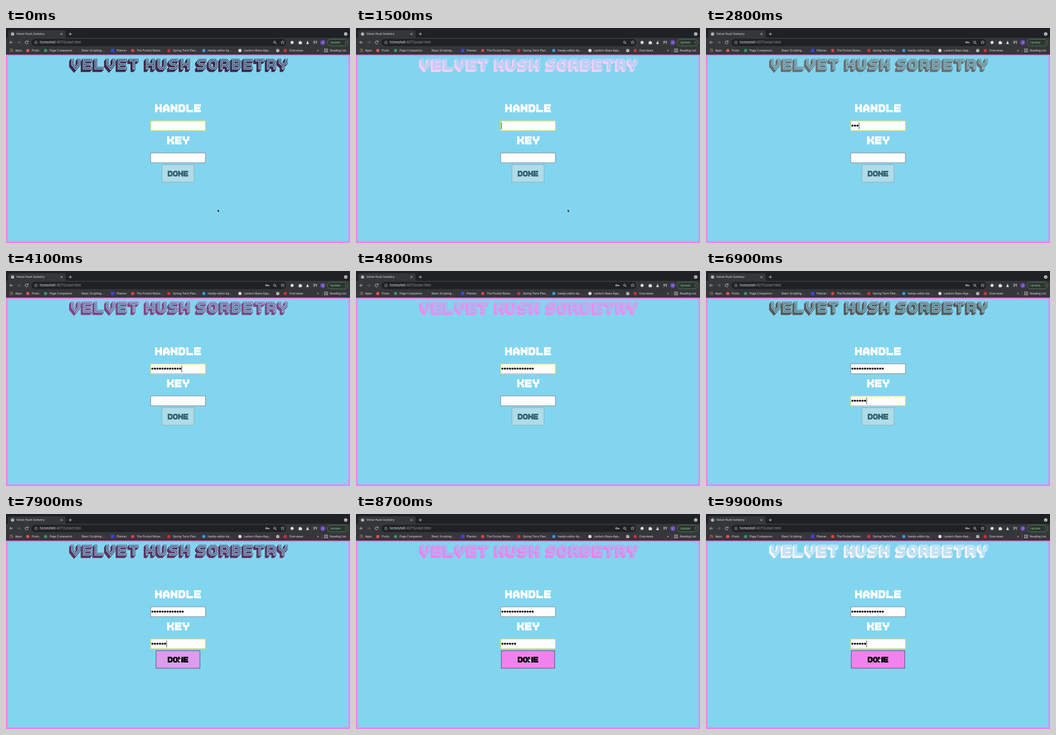
Animation, 600 px wide and 375 px high, one loop 10000 ms. Source, as an HTML page:

```html
<!DOCTYPE html>
<html lang="en">
<head>
<meta charset="utf-8">
<title>Velvet Hush Sorbetry</title>
<style>
  html, body { margin: 0; width: 100%; height: 100%; overflow: hidden; background: #82d5ef; }
  svg { display: block; width: 100vw; height: 100vh; }
  text { font-family: Inter, Roboto, sans-serif; }
</style>
</head>
<body>
<svg id="stage" viewBox="0 0 600 375" preserveAspectRatio="none"></svg>
<script>
const LOOP = 10000, SKY = '#82d5ef', VIOLET = '#f07ff0';
const stage = document.getElementById('stage');

function add(tag, attrs, parent = stage) {
  const el = document.createElementNS('http://www.w3.org/2000/svg', tag);
  set(el, attrs);
  parent.appendChild(el);
  return el;
}
function set(el, attrs) {
  for (const k in attrs) el.setAttribute(k, attrs[k]);
}
const rect = (x, y, width, height, fill, more) => add('rect', { x, y, width, height, fill, ...more });
const circle = (cx, cy, r, fill, more) => add('circle', { cx, cy, r, fill, ...more });
const line = (d, stroke = '#d5d7da', w = 0.8, parent) =>
  add('path', { d, stroke, 'stroke-width': w, fill: 'none' }, parent);
function label(str, x, y, size = 5, fill = '#e3e5e8') {
  const el = add('text', { x, y, 'font-size': size, fill });
  el.textContent = str;
  return el;
}
function globe(x, y) {
  circle(x, y, 2.8, '#d8dadd');
  line(`M${x - 2} ${y - 1}l1.6 .8l-.4 1.4M${x + 0.4} ${y - 2}l.4 1.3l1.4 .2M${x + 0.6} ${y + 1.8}l1-1`, '#44464a', 0.8);
}

// Block lettering: centre lines in a 12 x 14 box
const GLYPHS = {
  A: 'M2 12V6L5 2H7L10 6V12M2 9H10',
  B: 'M2 2H8L10 4V5L9 7L10 9V10L8 12H2ZM2 7H9',
  D: 'M2 2H8L10 4V10L8 12H2Z',
  E: 'M10 2H2V12H10M2 7H9',
  H: 'M2 2V12M10 2V12M2 7H10',
  K: 'M2 2V12M10 2V4L7 7L10 10V12M2 7H7',
  L: 'M2 2V12H10',
  N: 'M2 12V2M2 3.5L10 10.5M10 12V2',
  O: 'M4 2H8L10 4V10L8 12H4L2 10V4Z',
  R: 'M2 12V2H8L10 4V6L8 8H2M8 8L10 10V12',
  S: 'M10 2H4L2 4V5L4 7H8L10 9V10L8 12H2',
  T: 'M2 2H10M6 2V12',
  U: 'M2 2V10L4 12H8L10 10V2',
  V: 'M2 2V7L6 12L10 7V2',
  Y: 'M2 2V5L6 8L10 5V2M6 8V12'
};
function lettering(str, x, y, scale, step, stroke, weight, parent) {
  const g = add('g', {
    fill: 'none', stroke, 'stroke-width': weight, 'stroke-linecap': 'square', 'aria-label': str
  }, parent);
  for (const ch of str) {
    if (ch === ' ') { x += 8.3; continue; }
    add('path', { d: GLYPHS[ch], transform: `translate(${x} ${y}) scale(${scale})` }, g);
    x += step;
  }
  return g;
}

function drawBrowser() {
  rect(0, 0, 600, 46.5, '#35363a');
  rect(0, 0, 600, 17, '#202124');
  add('path', { d: 'M2 17Q4 17 4 14V7Q4 4 7 4H101Q104 4 104 7V14Q104 17 106 17Z', fill: '#35363a' });
  globe(11.5, 10.5);
  label('Velvet Hush Sorbetry', 18, 12.2, 4.9);
  line('M95 8.8l3.4 3.4m0-3.4l-3.4 3.4M109.5 10.5h5.4M112.2 7.8v5.4');
  circle(592.5, 10.5, 3, '#c4c7ca');
  line('M591 10l1.5 1.5l1.5-1.5', '#202124');

  line('M12 25H6.5M9 22.5L6.5 25L9 27.5');
  line('M19.5 25H25M22.5 22.5L25 25L22.5 27.5', '#77797d');
  line('M38.4 24A2.6 2.6 0 1 0 38.4 26.2M38.6 22.2V24.2H36.6');
  rect(44.5, 19, 444, 12.5, '#202124', { rx: 6.2 });
  circle(52.3, 25.2, 2.3, 'none', { stroke: '#c4c7ca', 'stroke-width': 0.6 });
  line('M52.3 24.8v1.7M52.3 23.6v.6', '#c4c7ca', 0.6);
  const url = label('', 59, 27.2, 5.6);
  add('tspan', {}, url).textContent = 'homeshell';
  add('tspan', { fill: '#989ba0' }, url).textContent = ':40713/start.html';

  circle(468.5, 24.7, 1.8, 'none', { stroke: '#d5d7da', 'stroke-width': 0.8 });
  line('M469.8 26l2 2');
  line('M482.5 22l.9 2h2.1l-1.7 1.4l.7 2.1l-2-1.2l-2 1.2l.7-2.1l-1.7-1.4h2.1Z', '#d5d7da', 0.6);
  circle(499, 25.2, 2.6, '#e8e8e8');
  add('path', { d: 'M510.5 23.5h1.6a1 1 0 0 1 2 0h1.6v1.6a1 1 0 0 1 0 2v1.2h-5.2Z', fill: '#e3e5e8' });
  add('path', { d: 'M526 22l2.4 6h-4.8Z', fill: '#d5d7da' });
  line('M536 23.2h4.5M536 25h4.5M536 26.8h2.5M541.5 27.5v-4.3h1.3');
  circle(552.5, 25.2, 4.2, '#6d4cc0');
  label('J', 551.3, 27, 4.8);
  rect(560.5, 19.5, 35.5, 11.5, '#2c332f', { rx: 5.8, stroke: '#569a64', 'stroke-width': 0.7 });
  label('Update', 565, 27.1, 5.4, '#82c995');
  for (const y of [23.2, 25.2, 27.2]) circle(592, y, 0.55, '#82c995');

  const dots = ['#e8594b', '#f1b83c', '#51a75c', '#4b86e8'];
  for (let i = 0; i < 9; i++)
    circle(7.2 + (i % 3) * 2.1, 37.1 + Math.floor(i / 3) * 2.1, 0.75, dots[i % 4]);
  const marks = [
    ['Apps', 16], ['Posts', 45, '#d8574c'], ['Page Companion', 76, '#2f9a66'],
    ['Basic Scripting:...', 132], ['Planner', 193, '#3843d8'],
    ['The Pocket Notes...', 228, '#d84540'], ['Spring Term Plan...', 291, '#c93532'],
    ['handy-editor-tip...', 352, '#3299dc'], ['Lantern-Base-App...', 415, '#e3e5e8'],
    ['Overviews', 494, '#c93532'], ['Reading List', 565]
  ];
  for (const [name, x, color] of marks) {
    label(name, x, 41.1, 4.9);
    if (name === 'Planner') rect(x - 10, 36.2, 6, 6, color, { rx: 0.8 });
    else if (color) circle(x - 7, 39.2, 2.8, color);
  }
  globe(474, 39.2);
  label('»', 542.5, 41, 5.5);
  line('M551 34.5v10', '#606267', 0.5);
  rect(555.5, 36.7, 5.5, 5, 'none', { stroke: '#d5d7da', 'stroke-width': 0.7 });
  line('M557 38.3h3M557 40h3', '#d5d7da', 0.6);
}

function field(y) {
  const box = rect(252.3, y, 95.6, 17, '#fdfdfd');
  const dots = Array.from({ length: 13 }, (_, i) => circle(255.4 + i * 4.4, y + 8.2, 1.75, '#000'));
  const caret = line(`M0 ${y + 2.5}v12`, '#000', 0.7);
  return (count, focused, caretOn) => {
    set(box, { stroke: focused ? '#cfdc72' : '#777b7e', 'stroke-width': focused ? 1.3 : 0.8 });
    dots.forEach((d, i) => set(d, { visibility: i < count ? 'visible' : 'hidden' }));
    set(caret, {
      transform: `translate(${253.8 + count * 4.4} 0)`,
      visibility: focused && caretOn ? 'visible' : 'hidden'
    });
  };
}

// Page
rect(0, 46, 600, 329, SKY);
rect(1.3, 47.3, 597.4, 326.4, 'none', { stroke: VIOLET, 'stroke-width': 2.6 });
drawBrowser();
const keyIcon = add('g', {});
add('circle', { cx: 454.3, cy: 25, r: 1.4, fill: 'none', stroke: '#d5d7da', 'stroke-width': 1 }, keyIcon);
line('M455.7 25h3.3v1.6M457.6 25v1.3', '#d5d7da', 0.9, keyIcon);

const title = add('g', {});
const titleLayer = (dx, dy, color, weight) =>
  lettering('VELVET HUSH SORBETRY', 113 + dx, 53.6 + dy, 1.4, 20.3, color, weight, title);
for (let i = 6; i > 0; i--) titleLayer(-i / 2, i * 0.6, 'currentColor', 3.8);
titleLayer(0, 0, 'currentColor', 3.8);
titleLayer(0, 0, SKY, 2.7);
titleLayer(0, 0, 'currentColor', 0.9);

lettering('HANDLE', 260, 133, 1, 13.6, '#fff', 3.9);
lettering('KEY', 281, 189, 1, 13.5, '#fff', 3.9);
const handleField = field(162), keyField = field(218);
const button = rect(272, 238.3, 56, 30.7, '#aedce9', { 'stroke-width': 0.8 });
const done = lettering('DONE', 282, 249, 0.72, 9.1, '#356470', 3.8);

const arrow = add('path', {
  d: 'M0 0V5.2L1.2 4.1L2 5.9L2.9 5.5L2.1 3.8H3.7Z', fill: '#000', stroke: '#fff', 'stroke-width': 0.35
});
const beam = line('M-1 -3.5h2M0 -3.5v7M-1 3.5h2', '#000', 0.6);
const hand = add('path', {
  d: 'M-.6 -2.8V.6L-1.8 -.2L-2.4 .5L-.6 3.4H2.2L2.9 .8V-.7L.6 -1.2V-2.8Z',
  fill: '#fff', stroke: '#000', 'stroke-width': 0.5
});

// Motion
const PATH = [
  [0, 369, 316], [5100, 369, 316], [5600, 360, 265], [6000, 318, 227],
  [7300, 318, 227], [7800, 303, 254], [LOOP, 303, 254]
];
function pointer(t) {
  const i = PATH.findIndex(p => p[0] > t);
  const [t0, x0, y0] = PATH[i - 1], [t1, x1, y1] = PATH[i];
  const k = (t - t0) / (t1 - t0);
  return [x0 + (x1 - x0) * k, y0 + (y1 - y0) * k];
}
const typed = (t, start, step, max) => t < start ? 0 : Math.min(max, 1 + Math.floor((t - start) / step));
const mix = (a, b, k) => `rgb(${a.map((v, i) => Math.round(v + (b[i] - v) * k))})`;
const CYCLE = [[0, 0, 0], [238, 130, 238], [255, 255, 255]];
function titleColor(t) {
  const phase = t < 400 ? 0.1 : t < 700 ? 0.2 : (t + 630) / 4000 % 1;
  const i = Math.floor(phase * 3);
  return mix(CYCLE[i], CYCLE[(i + 1) % 3], phase * 3 - i);
}

function draw(t) {
  title.style.color = titleColor(t);
  const onKey = t >= 6000;
  const handleCount = typed(t, 2500, 145, 13), keyCount = typed(t, 6250, 120, 6);
  let blink = t % 1000 >= 500;
  if (t >= 2500) blink = t < 4240 || (t - 4240) % 1000 < 500;
  if (onKey) blink = t < 6850 || (t - 6850) % 1000 < 500;
  handleField(handleCount, !onKey, blink);
  keyField(keyCount, onKey, blink);
  set(keyIcon, { visibility: t >= 2500 ? 'visible' : 'hidden' });

  const hover = t >= 7600;
  const k = hover ? 1 - (1 - Math.min(1, (t - 7600) / 1300)) ** 3 : 0;
  const w = 56 + 37.5 * k;
  set(button, {
    x: 300 - w / 2, width: w,
    fill: mix([174, 220, 233], [240, 130, 238], Math.min(1, k * 1.3)),
    stroke: hover ? '#4d3b55' : '#83a9b5'
  });
  set(done, { stroke: hover ? '#000' : '#356470' });

  const [x, y] = pointer(t);
  const shown = t < 2500 || (t >= 5200 && t < 6250) || t >= 7300;
  const inField = y > 218 && y < 236 && x < 348;
  const kind = !shown ? null : hover ? hand : inField ? beam : arrow;
  for (const c of [arrow, beam, hand])
    set(c, { transform: `translate(${x} ${y})`, visibility: c === kind ? 'visible' : 'hidden' });
}

const start = performance.now();
function tick(now) {
  const t = Math.max(0, now - start) % LOOP;
  draw(Math.floor(t / 100) * 100);
  requestAnimationFrame(tick);
}
draw(0);
requestAnimationFrame(tick);
</script>
</body>
</html>
```
